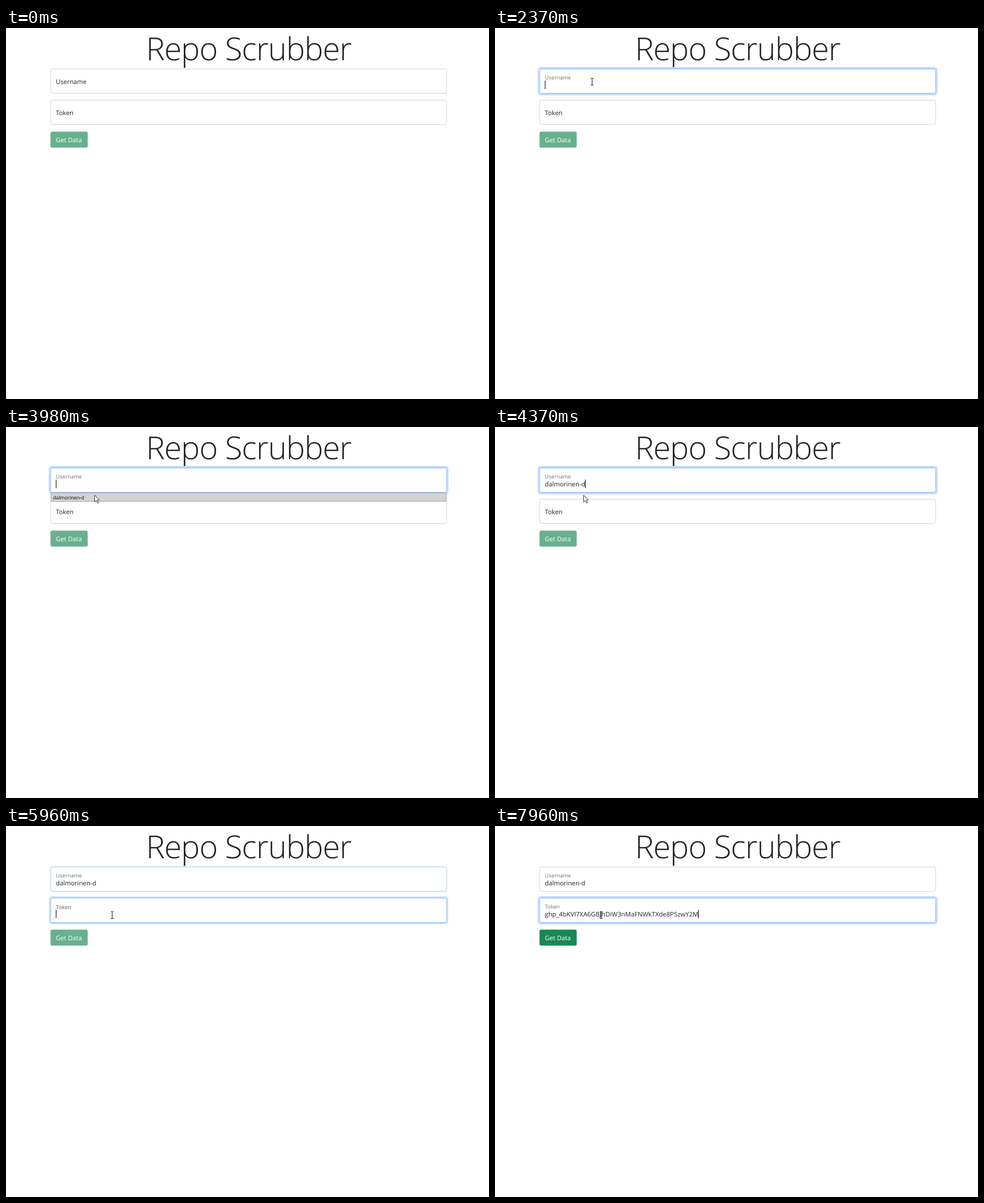
An HTML page for the animation above (8 s loop, 853 px wide and 656 px high).

```html
<!DOCTYPE html>
<html lang="en">
<head>
<meta charset="utf-8">
<title>Repo Scrubber</title>
<style>
  html, body { margin: 0; width: 100%; height: 100%; overflow: hidden; background: #fff; }
  svg { display: block; width: 853px; height: 656px; }
  text { font: 11.25px "Open Sans", "Noto Sans", sans-serif; fill: #212529; text-rendering: geometricPrecision; white-space: pre; }
  .title { font-size: 56px; font-weight: 300; letter-spacing: -.018em; text-anchor: middle; }
  .box { fill: #fff; }
  .ring { fill: none; stroke: #c2dbfe; }
  .option { font-size: 8.7px; fill: #000; }
</style>
</head>
<body>
<svg viewBox="0 0 853 656">
  <text class="title" x="428.5" y="56.5">Repo Scrubber</text>
  <g id="fields"></g>
  <g id="button">
    <rect x="78.6" y="183.2" width="65.7" height="28.4" rx="3" fill="#198754"/>
    <text x="88" y="202" style="fill:#fff">Get Data</text>
  </g>
  <g id="menu">
    <rect id="menuBox" x="79.5" y="116.5" width="698" height="15" stroke="#a5a5a5"/>
    <text class="option" x="83" y="128">dalmorinen-d</text>
  </g>
  <path id="caret" stroke="#000"/>
  <path id="arrow" d="M.5 .5V12.6L3.3 10 5.5 14.6 7.4 13.7 5.3 9.2H8.9Z" fill="#fff" stroke="#222" stroke-width=".9"/>
  <path id="beam" d="M-2.5-6H-.7L0-5.4.7-6H2.5M0-5.4V5.4M-2.5 6H-.7L0 5.4.7 6H2.5" fill="none" stroke="#222" stroke-width="1.1"/>
</svg>
<script>
const LOOP = 8000;
const $ = id => document.getElementById(id);

// Each track is a list of [start time, ...values]; values hold until the next entry.
const pointerTrack = [
  [0, null], [1190, 'arrow', 636, 195], [1320, 'arrow', 340, 142], [1440, 'beam', 180, 96],
  [1840, 'beam', 171.5, 95], [3560, 'beam', 169.5, 99], [3690, 'beam', 164.5, 105],
  [3830, 'beam', 158.5, 113], [3980, 'arrow', 156, 120], [5170, 'arrow', 167, 125],
  [5300, 'beam', 178.5, 138], [5430, 'beam', 184.5, 150], [5560, 'beam', 187.5, 157.5]
];
const userFocus = [[0, 0], [1980, .3], [2370, 1], [5830, .7], [5960, .2], [6350, 0]];
const tokenFocus = [[0, 0], [5830, .3], [5960, .8], [6350, 1]];
const caretTrack = [
  [0, 0], [1980, 1], [2900, 0], [3430, 1], [4510, 0], [5030, 1],
  [5560, 0], [5960, 1], [6890, 0], [7410, 1]
];
const menuTrack = [[0, null], [2630, '#fff'], [3980, '#d3d3d3'], [4240, null]];
const FILL_USER = 4240, FOCUS_TOKEN = 5830, FILL_TOKEN = 7540, ENABLE = 7960;

const at = (track, t) => track.findLast(entry => entry[0] <= t).slice(1);
const mix = (a, b, p) => a + (b - a) * p;
const show = (el, on) => el.style.display = on ? '' : 'none';

function add(parent, tag, attrs, content = '') {
  const el = document.createElementNS('http://www.w3.org/2000/svg', tag);
  for (const key in attrs) el.setAttribute(key, attrs[key]);
  el.textContent = content;
  return parent.appendChild(el);
}

function makeField(y, name, content) {
  const group = add($('fields'), 'g', {});
  const ring = add(group, 'rect', { class: 'ring' });
  const box = add(group, 'rect', { class: 'box', x: 79, y: y + .5, width: 699, height: 43, rx: 3 });
  const label = add(group, 'text', {}, name);
  const value = add(group, 'text', { x: 88, y: y + 33 }, content);
  return {
    y, value,
    draw(focus, filled) {
      const raised = Math.max(focus, filled ? 1 : 0), spread = 3 * focus;
      const edge = { x: 78.5 - spread / 2, y: y - spread / 2, width: 700 + spread, height: 44 + spread, rx: 4, 'stroke-width': spread };
      for (const key in edge) ring.setAttribute(key, edge[key]);
      box.setAttribute('stroke', `rgb(${mix(206, 134, focus)},${mix(212, 183, focus)},${mix(218, 254, focus)})`);
      label.setAttribute('transform', `translate(88 ${mix(y + 27, y + 18.5, raised)}) scale(${mix(1, .85, raised)})`);
      label.setAttribute('opacity', mix(1, .65, raised));
      show(value, filled);
    }
  };
}

const user = makeField(72, 'Username', 'dalmorinen-d');
const token = makeField(127, 'Token', 'ghp_4bKVI7XA6GBJhDiW3nMaFNWkTXde8P5zwY2M');

function draw(t) {
  user.draw(at(userFocus, t)[0], t >= FILL_USER);
  token.draw(at(tokenFocus, t)[0], t >= FILL_TOKEN);
  $('button').setAttribute('opacity', t >= ENABLE ? 1 : .65);

  const [menuColor] = at(menuTrack, t);
  show($('menu'), menuColor);
  if (menuColor) $('menuBox').setAttribute('fill', menuColor);

  const field = t < FOCUS_TOKEN ? user : token;
  const filled = t >= (field === user ? FILL_USER : FILL_TOKEN);
  const caretX = Math.round(88 + (filled ? field.value.getComputedTextLength() : 0)) + .5;
  show($('caret'), at(caretTrack, t)[0]);
  $('caret').setAttribute('d', `M${caretX} ${field.y + 21}v15`);

  const [shape, x, y] = at(pointerTrack, t);
  for (const id of ['arrow', 'beam']) {
    show($(id), id === shape);
    if (id === shape) $(id).setAttribute('transform', `translate(${x} ${y})`);
  }
}

const start = performance.now();
function tick() {
  draw((performance.now() - start) % LOOP);
  requestAnimationFrame(tick);
}
tick();
</script>
</body>
</html>
```
